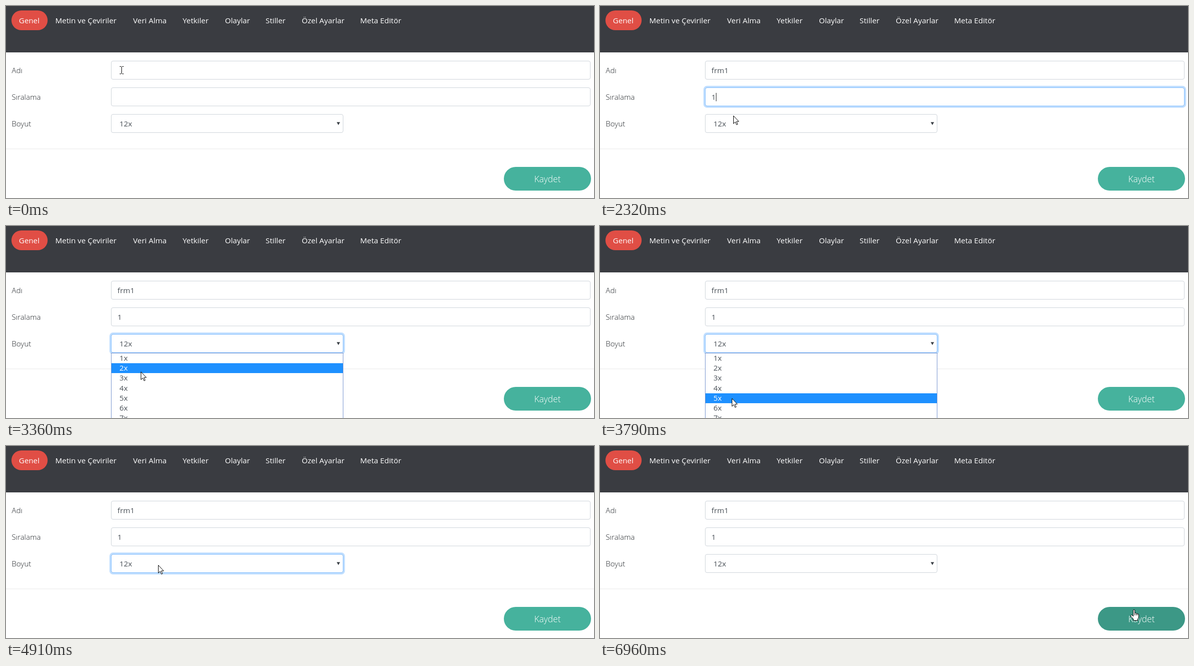
An HTML page that plays this animation: 1187 px wide and 389 px high, repeating every 7.13 s.

```html
<!DOCTYPE html>
<html lang="tr">
<head>
<meta charset="utf-8">
<style>
  html, body { margin: 0; width: 100%; height: 100%; overflow: hidden; background: #fff; }
  svg { display: block; width: 1187px; height: 389px; }
  text { font: 400 15.3px "Open Sans", "Noto Sans", sans-serif; fill: #495057; white-space: pre; }
  .nav text { fill: #fff; }
  .label text { font-weight: 300; fill: #212529; }
  .save { font-size: 17.6px; fill: #fff; font-weight: 300; }
  .box { fill: #fff; stroke: #ced4da; }
  .focus { fill: none; }
  .caret { fill: #222; }
  .ink { stroke: #000; fill: #fff; }
</style>
</head>
<body>
<svg id="stage" viewBox="0 0 1187 389"></svg>
<script>
const LOOP = 7130;
const ROW = 20.2;

const tabs = [["Genel", 26], ["Metin ve Çeviriler", 99.5], ["Veri Alma", 256.5], ["Yetkiler", 356.5],
  ["Olaylar", 442], ["Stiller", 524], ["Özel Ayarlar", 597], ["Meta Editör", 715]];
const labels = [["Adı", 136], ["Sıralama", 190], ["Boyut", 244]];
const fields = [[111, 968], [165, 968], [219, 469]];

// [time, value...] rows, linear in between
const focusKeys = [
  [[100, 0], [260, 1], [1720, 1], [1880, 0]],
  [[1720, 0], [1880, 1], [2690, 1], [2930, 0]],
  [[2690, 0], [2880, 1], [5590, 1], [5760, 0]]
];
const hoverKeys = [[6330, 0], [6490, 1]];
const path = [
  [0, 233, 130], [900, 233, 130], [1230, 238, 172], [1390, 238, 171], [1590, 238, 169],
  [1720, 237, 184], [2090, 238, 187], [2190, 247, 196], [2320, 269, 222], [2480, 274, 238],
  [2920, 274, 240], [3100, 274, 258], [3360, 272, 295], [3560, 272, 312], [3900, 263, 366],
  [4190, 256, 293], [4390, 257, 290], [4700, 285, 242], [5140, 330, 240], [5500, 630, 292],
  [5640, 649, 295], [5860, 649, 295], [6100, 800, 308], [6330, 1010, 338], [6520, 1061, 341],
  [6660, 1063, 340], [6800, 1080, 326], [6960, 1076, 331]
];

// [time, value] rows, held until the next
const nameKeys = [[0, ""], [700, "f"], [840, "fr"], [980, "frm"], [1080, "frm1"]];
const orderKeys = [[0, ""], [2060, "1"]];
const caretKeys = [[0, 0], [170, 225], [520, 0], [700, 230.5], [840, 236.5], [980, 250.5],
  [1080, 260], [1580, 0], [1760, 225], [2060, 234], [2590, 0]];
const pointerKeys = [[0, "beam"], [2250, "arrow"], [6330, "hand"]];

const text = (s, x, y, more = "") => `<text x="${x}" y="${y}" ${more}>${s}</text>`;
const rect = (x, y, w, h, more) => `<rect x="${x}" y="${y}" width="${w}" height="${h}" ${more}/>`;
const rowTop = i => 258 + Math.round(ROW * i);

const fieldMarkup = ([y, w], i) =>
  rect(212.5, y + .5, w - 1, 37, 'rx="3.5" class="box"') +
  `<g class="focus" id="focus${i}">` +
  rect(210.4, y - 1.6, w + 3.2, 41.2, 'rx="5.6" stroke="#007bff" stroke-opacity=".25" stroke-width="3.2"') +
  rect(212.5, y + .5, w - 1, 37, 'rx="3.5" stroke="#80bdff"') + "</g>";

const options = Array.from({ length: 7 }, (_, i) => text(`${i + 1}x`, 229, rowTop(i) + 15)).join("");

stage.innerHTML =
  rect(0, 0, 1187, 94, 'fill="#3a3c41"') +
  rect(11, 9, 73, 40, 'rx="20" fill="#e04e45"') +
  `<g class="nav">${tabs.map(([s, x]) => text(s, x, 35)).join("")}</g>` +
  `<g class="label">${labels.map(([s, y]) => text(s, 11.5, y)).join("")}</g>` +
  rect(0, 289, 1187, 1, 'fill="#e9e9ea"') +
  fields.map(fieldMarkup).join("") +
  text("", 225, 136, 'id="nameText"') + text("", 225, 190, 'id="orderText"') + text("12x", 229, 244) +
  '<path d="M667.6 235.2H674.4L671 241.2Z" fill="#3c4248"/>' +
  rect(0, 0, 1, 17, 'class="caret" id="caret"') +
  rect(1005, 326, 176, 48, 'rx="24" id="button"') +
  text("Kaydet", 1093, 357, 'class="save" text-anchor="middle"') +
  '<g id="list">' + rect(212.5, 257.5, 468, 140, 'fill="#fff" stroke="#7795cf"') +
  rect(213, 0, 467, 20, 'fill="#1e90ff" id="bar"') + options + "</g>" +
  '<g id="beam"><path d="M-3.5 -7.5H-.5M1.5 -7.5H4.5M-3.5 7.5H-.5M1.5 7.5H4.5M.5 -7V7" fill="none" stroke="#000"/></g>' +
  '<g id="arrow"><path class="ink" d="M.5 .5V16.3L4.1 12.9 6.7 18.6 9 17.6 6.5 12H11.3Z"/></g>' +
  '<g id="hand"><path class="ink" stroke-linejoin="round" d="M.5 13V2Q.5 .5 2 .5T3.5 2V7.5Q5.5 6.3 6.5 8.3 8.4 7.3 9 9.2 11.5 8.6 11.5 11V15Q11.5 17.5 9.5 19.5V22.5H1V20L-4.3 14Q-5.3 12 -3.5 11.3 -2.3 11 .5 14Z"/>' +
  '<path d="M3.5 7.5V12M6.5 8.5V12M9 9.5V12" fill="none" stroke="#000"/></g>';

const $ = id => document.getElementById(id);
const optionTexts = [...$("list").querySelectorAll("text")];

function held(keys, t) {
  let value = keys[0][1];
  for (const [time, v] of keys) if (time <= t) value = v;
  return value;
}

function tween(keys, t) {
  const next = keys.findIndex(k => k[0] > t);
  if (next === 0) return keys[0].slice(1);
  if (next < 0) return keys[keys.length - 1].slice(1);
  const a = keys[next - 1], b = keys[next];
  const p = (t - a[0]) / (b[0] - a[0]);
  return a.slice(1).map((v, i) => v + (b[i + 1] - v) * p);
}

const show = (el, on) => el.setAttribute("visibility", on ? "visible" : "hidden");

function draw(t) {
  focusKeys.forEach((keys, i) => $("focus" + i).setAttribute("opacity", tween(keys, t)[0]));
  $("nameText").textContent = held(nameKeys, t);
  $("orderText").textContent = held(orderKeys, t);

  const caretX = held(caretKeys, t);
  show($("caret"), caretX > 0);
  $("caret").setAttribute("x", Math.round(caretX));
  $("caret").setAttribute("y", t < 1720 ? 122 : 176);

  const [x, y] = tween(path, t).map(Math.round);
  const pointer = held(pointerKeys, t);
  for (const id of ["beam", "arrow", "hand"]) {
    show($(id), id === pointer);
    $(id).setAttribute("transform", `translate(${x} ${y})`);
  }

  // the highlight follows the pointer but never leaves the lower rows
  const row = Math.max(1, Math.min(5, Math.floor((y - 258) / ROW)));
  const open = t >= 2940 && t < 4760;
  show($("list"), open);
  $("bar").setAttribute("y", rowTop(row));
  optionTexts.forEach((el, i) => el.style.fill = i === row ? "#fff" : "");

  const h = tween(hoverKeys, t)[0];
  const mix = (a, b) => Math.round(a + (b - a) * h);
  $("button").setAttribute("fill", `rgb(${mix(70, 60)},${mix(178, 152)},${mix(157, 134)})`);
}

function tick() {
  draw(performance.now() % LOOP);
  requestAnimationFrame(tick);
}
tick();
</script>
</body>
</html>
```
